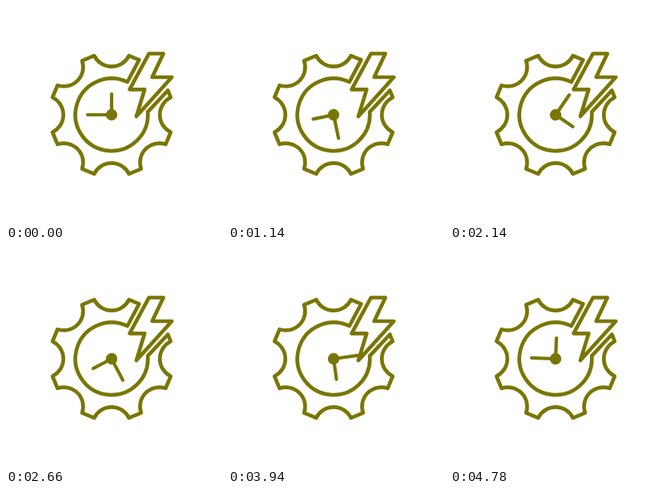
An HTML page that plays this animation: 270 px wide and 270 px high, repeating every 4.8 s.

```html
<!DOCTYPE html>
<html lang="en">
<head>
<meta charset="utf-8">
<title>Gear clock</title>
<style>
  html, body { margin: 0; width: 100%; height: 100%; overflow: hidden; background: #fff; }
  svg { display: block; width: 100%; height: 100%; }
  .line { fill: none; stroke: #7a7604; stroke-width: 4.7; stroke-linecap: round; stroke-linejoin: round; }
  .hand { stroke-width: 4.2; }
  .hub { fill: #7a7604; }
</style>
</head>
<body>
<svg viewBox="0 0 270 270">
  <path id="gear" class="line"/>
  <path class="line" d="M178.7 59.5H196.7L182.7 89H207.3L163 138L173.3 104.3H154.5Z"/>
  <g id="hands">
    <path class="line hand" d="M132 110V136H102"/>
    <circle class="hub" cx="132" cy="136" r="7.2"/>
  </g>
</svg>
<script>
  const CX = 132, CY = 136, TIP = 77, HALF_TOOTH = 6.1, NOTCH = 24.2;
  const LOOP = 4800, TURN = 1590, STEP = 20;

  // Point on the gear rim; degrees run clockwise from the top.
  const rim = deg => {
    const a = deg * Math.PI / 180;
    return `${(CX + TIP * Math.sin(a)).toFixed(2)} ${(CY - TIP * Math.cos(a)).toFixed(2)}`;
  };

  // Outline runs anticlockwise around the teeth, then back along the inner ring.
  let outline = `M151.7 95L166.4 67.4L${rim(22.5 - HALF_TOOTH)}`;
  for (let tooth = -22.5; tooth > -300; tooth -= 45) {
    outline += `A${NOTCH} ${NOTCH} 0 0 1 ${rim(tooth + HALF_TOOTH)}`;
    if (tooth > -290) outline += `L${rim(tooth - HALF_TOOTH)}`;
  }
  outline += 'L202.4 105.5L177.2 132.3A45.3 45.3 0 1 1 151.7 95';
  document.getElementById('gear').setAttribute('d', outline);

  const hands = document.getElementById('hands');
  function draw() {
    const t = Math.floor(performance.now() % LOOP / STEP) * STEP;
    hands.setAttribute('transform', `rotate(${t / TURN * 360} ${CX} ${CY})`);
    requestAnimationFrame(draw);
  }
  draw();
</script>
</body>
</html>
```
